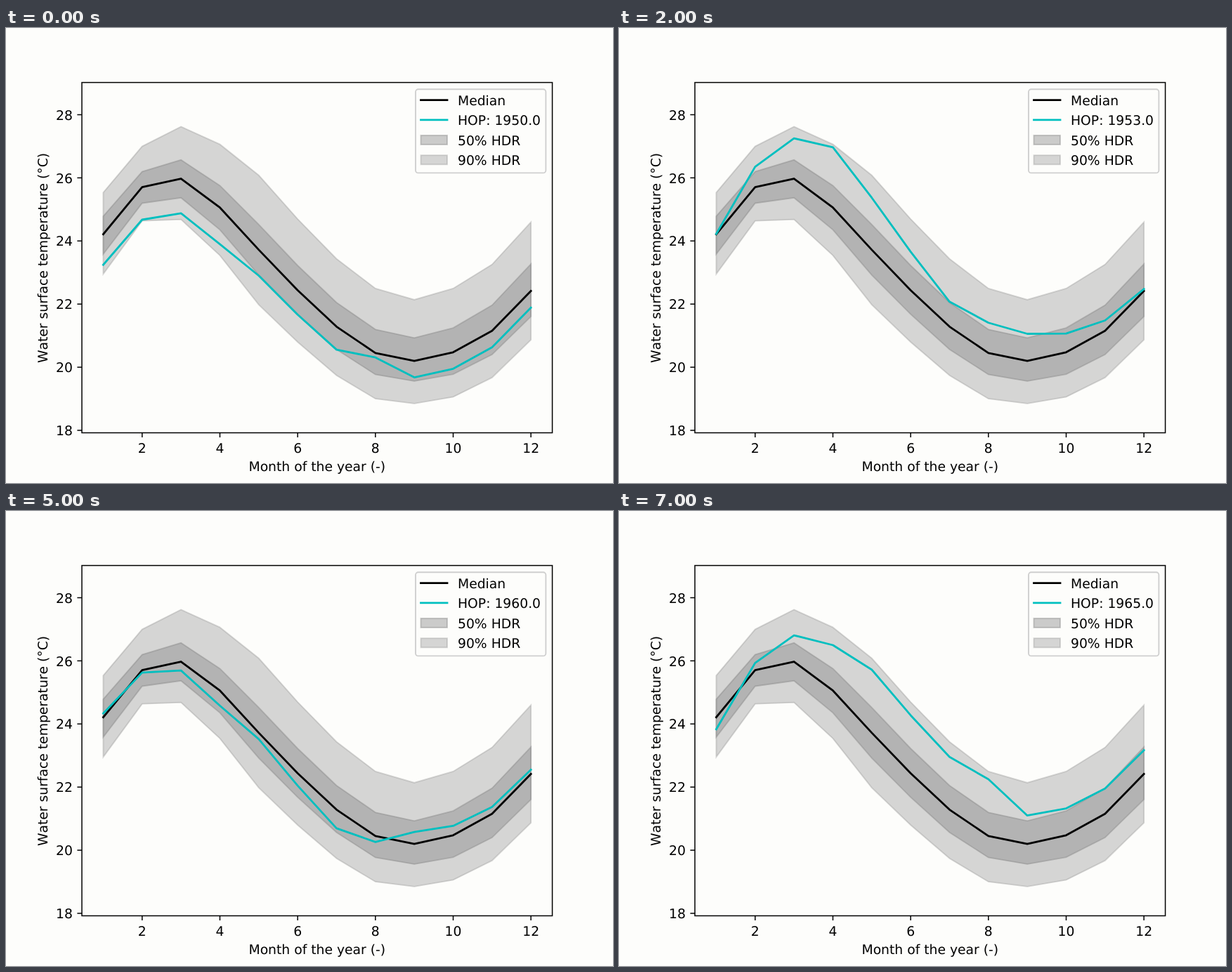
An HTML page for the animation above (8 s loop, 864 by 648 pixels).

```html
<!DOCTYPE html>
<html lang="en">
<head>
<meta charset="utf-8">
<title>Water surface temperature</title>
<style>
  html, body { margin: 0; width: 100%; height: 100%; overflow: hidden; background: #fdfdfb; }
  svg { display: block; width: 864px; height: 648px; }
  text { font: 18.75px "DejaVu Sans", sans-serif; font-kerning: none; text-rendering: geometricPrecision; fill: #000; }
  .axis { fill: none; stroke: #000; stroke-width: 1.5; }
  .line { fill: none; stroke: #000; stroke-width: 2.81; stroke-linecap: square; stroke-linejoin: round; }
  .hop { stroke: #00bfbf; }
  .band { fill: #808080; stroke: #808080; stroke-width: 1.87; }
  .outer { fill-opacity: .32; stroke-opacity: .3; }
  .inner { fill-opacity: .4; stroke-opacity: .4; }
  .box { fill: #fdfdfb; stroke: #cfcfcf; stroke-width: 1.87; }
</style>
</head>
<body>
<svg id="chart" viewBox="0 0 864 648"></svg>
<script>
const STEP = 1000;
const chart = document.getElementById('chart');
const months = Array.from({ length: 12 }, (_, i) => i + 1);
const monthX = m => 138.44 + (m - 1) * 55.34;
const tempY = t => 573 - (t - 18) * 44.95;

// Yearly cycle: mean plus three harmonics, peaking in March.
const waves = [[2.841, -.105], [.329, -.18], [.047, -.116]];
function median(m) {
  const a = (m - 3) * Math.PI / 6;
  return waves.reduce((t, [c, s], i) =>
    t + c * Math.cos((i + 1) * a) + s * Math.sin((i + 1) * a), 22.758);
}

// Straight lines between a few key months, in °C away from the median.
const ramp = (keys, values) => m => {
  const i = Math.max(1, keys.findIndex(k => k >= m));
  const u = (m - keys[i - 1]) / (keys[i] - keys[i - 1]);
  return values[i - 1] + u * (values[i] - values[i - 1]);
};
const spread = (...values) => ramp([1, 2, 5, 9, 12], values);
const anomaly = (...values) => ramp([1, 4, 5, 7, 8, 9, 12], values);

const years = [
  [1950, anomaly(-.97, -1.16, -.82, -.73, -.14, -.52, -.53)],
  [1951, anomaly(0, .45, 1.05, 2.13, 1.8, 1.3, .5)],
  [1953, anomaly(.01, 1.91, 1.65, .79, .96, .86, .06)],
  [1955, anomaly(-.48, -.75, -1.25, -.55, -.62, -.6, -.95)],
  [1958, anomaly(.35, 1.36, 1.11, .94, .22, .56, .19)],
  [1960, anomaly(.12, -.48, -.2, -.59, -.19, .38, .13)],
  [1963, anomaly(-.13, .48, .9, .54, .8, .64, .44)],
  [1965, anomaly(-.38, 1.44, 2, 1.67, 1.8, .9, .75)]
];

const curve = (offset, sign = 1) =>
  months.map(m => [monthX(m), tempY(median(m) + sign * offset(m))]);
const path = pts => 'M' + pts.map(p => p.join(' ')).join('L');

function add(tag, attrs, text = '') {
  const el = document.createElementNS('http://www.w3.org/2000/svg', tag);
  for (const key in attrs) el.setAttribute(key, attrs[key]);
  el.textContent = text;
  return chart.appendChild(el);
}
const label = (x, y, text, anchor = 'start', more = {}) =>
  add('text', { x, y, 'text-anchor': anchor, ...more }, text);
const line = (cls, d) => add('path', { class: cls, d });
const band = (cls, up, down) =>
  line('band ' + cls, path([...curve(up), ...curve(down, -1).reverse()]) + 'Z');

band('outer', spread(1.32, 1.29, 2.36, 1.94, 2.18), spread(1.26, 1.07, 1.74, 1.35, 1.55));
band('inner', spread(.57, .49, .8, .73, .85), spread(.63, .51, .8, .64, .81));
line('line', path(curve(() => 0)));
const hop = line('line hop', '');

add('rect', { class: 'axis', x: 108, y: 77.6, width: 669.6, height: 498.9 });
for (let m = 2; m <= 12; m += 2) {
  line('axis', `M${monthX(m)} 576.5v6.6`);
  label(monthX(m), 605, m, 'middle');
}
for (let t = 18; t <= 28; t += 2) {
  line('axis', `M108 ${tempY(t)}h-6.6`);
  label(94.9, tempY(t) + 7.1, t, 'end');
}
label(442.8, 631, 'Month of the year (-)', 'middle');
label(0, 0, 'Water surface temperature (°C)', 'middle', { transform: 'translate(59 327.5) rotate(-90)' });

add('rect', { class: 'box', x: 583, y: 87.2, width: 185.4, height: 119.2, rx: 3.75 });
const rowY = i => 102.6 + i * 28.35;
const rowLabel = (i, text) => label(643, rowY(i) + 7.2, text);
['', ' hop'].forEach((cls, i) => line('line' + cls, `M590.5 ${rowY(i)}h37.5`));
['inner', 'outer'].forEach((cls, i) =>
  add('rect', { class: 'band ' + cls, x: 590.5, y: rowY(i + 2) - 6.4, width: 37.5, height: 13.1 }));
rowLabel(0, 'Median');
const hopLabel = rowLabel(1, '');
rowLabel(2, '50% HDR');
rowLabel(3, '90% HDR');

let shown = -1;
function draw() {
  const i = Math.floor(performance.now() / STEP) % years.length;
  if (i !== shown) {
    const [year, offset] = years[i];
    hop.setAttribute('d', path(curve(offset)));
    hopLabel.textContent = `HOP: ${year}.0`;
    shown = i;
  }
  requestAnimationFrame(draw);
}
draw();
</script>
</body>
</html>
```
